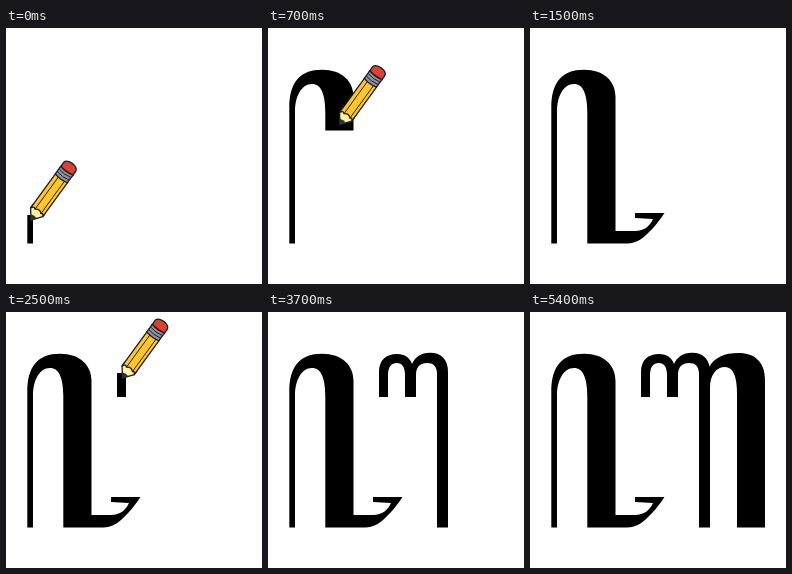
Write an HTML page without scripts that moves like this. It is 256 px wide and 256 px high and loops after 7.4 s.

```html
<!DOCTYPE html>
<html lang="en">
<head>
<meta charset="utf-8">
<title>Pencil writing</title>
<style>
@property --d { syntax: "<number>"; inherits: true; initial-value: 0; }
@property --on { syntax: "<number>"; inherits: true; initial-value: 0; }

html, body { margin: 0; width: 100%; height: 100%; overflow: hidden; background: #fff; }
svg { display: block; width: 100vw; height: 100vh; }

/* --d: length of the stroke drawn so far, --on: pencil visible */
.stroke { animation: 7.4s step-end infinite; }
.ink {
  d: var(--line);
  fill: none;
  stroke: #fff;
  stroke-dasharray: calc(var(--d) * 1px) 999px;
}
.pen {
  opacity: var(--on);
  offset-path: var(--line);
  offset-distance: calc((var(--d) - 5.5) * 1px);
  offset-rotate: 0deg;
}

#one {
  --line: path("M24 216V75A23.5 27 0 0 1 71 75V198Q71 209 82 209H100Q118 209 132 187L134 185H105");
  animation-name: one;
}
#two {
  --line: path("M115.5 85V59A13.5 12.5 0 0 1 142.5 59V85V59A16 12.5 0 0 1 174.5 59V216");
  animation-name: two;
}
#three {
  --line: path("M178 78C182 56 190 48.500 200 48.500H206C216 49 221 58 221 72V216");
  animation-name: three;
}

@keyframes one {
  0% { --d: 29; --on: 1; animation-timing-function: steps(7); }
  9.459% { --d: 247.5; --on: 1; }
  10.81% { --d: 258; --on: 1; animation-timing-function: steps(6); }
  18.918% { --d: 427; --on: 1; }
  20.27%, 100% { --d: 900; --on: 0; }
}
@keyframes two {
  0% { --d: 0; --on: 0; }
  33.783% { --d: 24; --on: 1; animation-timing-function: steps(7); }
  43.243% { --d: 213; --on: 1; animation-timing-function: steps(4); }
  48.648% { --d: 299; --on: 1; }
  49.999%, 100% { --d: 900; --on: 0; }
}
@keyframes three {
  0% { --d: 0; --on: 0; }
  63.513% { --d: 42; --on: 1; animation-timing-function: steps(6); }
  71.621% { --d: 192; --on: 1; }
  72.972%, 100% { --d: 900; --on: 0; }
}
</style>
</head>
<body>
<svg viewBox="0 0 256 256">
  <defs>
    <!-- tip near 0,0 -->
    <g id="pencil" transform="translate(.5 .3) rotate(36)" stroke="#1d1a2b" stroke-width="1.3" stroke-linejoin="round">
      <path fill="#fff3a0" d="M0 -.7L-7.500 -10.500V-15H7.500V-10.500Z"/>
      <path fill="#2b303c" stroke="none" d="M0 0L-4 -5.600Q0 -7.200 4 -5.600Z"/>
      <path fill="#ffc629" d="M-7.500 -10.500Q-5.500 -14.500 -3.200 -12Q.5 -15.500 4.200 -12Q6 -14 7.500 -10.500V-53H-7.500Z"/>
      <path fill="none" stroke-width=".9" d="M-3.200 -12V-53M4.200 -12V-53"/>
      <path fill="#d9432f" d="M-7.500 -61V-67Q-7 -70.500 0 -71Q7 -70.500 7.500 -67V-61Z"/>
      <path fill="#8f919e" d="M-7.500 -52.500Q0 -50.500 7.500 -52.500V-62Q0 -60 -7.500 -62Z"/>
      <path fill="none" stroke-width=".9" d="M-7.500 -55.700Q0 -53.700 7.500 -55.700M-7.500 -58.800Q0 -56.800 7.500 -58.800"/>
    </g>
  </defs>

  <g class="stroke" id="one">
    <mask id="m1" maskUnits="userSpaceOnUse" x="0" y="0" width="256" height="256">
      <path class="ink" stroke-width="44"/>
    </mask>
    <path mask="url(#m1)" d="M21.300 215.500V80C21.300 54 32 41.700 54 41.700C74 41.700 85.500 53 85.500 69V203H105C114 203 120 198 123 191L105 190V185H134.500C130 192 122 202 115 208C108 214 103 215.500 94 215.500H57.300V84C57.300 66 53 56 44 56C33 56 27 69 27 84V215.500Z"/>
    <g class="pen"><use href="#pencil"/></g>
  </g>

  <g class="stroke" id="two">
    <mask id="m2" maskUnits="userSpaceOnUse" x="0" y="0" width="256" height="256">
      <path class="ink" stroke-width="20"/>
    </mask>
    <path mask="url(#m2)" d="M111 85.500V60C111 48 118 42 129 42C137 42 142 46 144 52C147 45 153 40.700 162 40.700C174 40.700 180 48 180 60V215.500H169V62C169 54 165 51 159 51C152 51 148 55 148 63V85.500H137V63C137 55 134 51 129 51C123 51 120 55 120 63V85.500Z"/>
    <g class="pen"><use href="#pencil"/></g>
  </g>

  <g class="stroke" id="three">
    <mask id="m3" maskUnits="userSpaceOnUse" x="0" y="0" width="256" height="256">
      <path class="ink" stroke-width="36"/>
    </mask>
    <path mask="url(#m3)" d="M179 55C185 45 195 41 208 41C226 41 235 51 235 68V215.500H207V82C207 64 203 55 195 55C186 55 180 63 180 76H179Z"/>
    <g class="pen"><use href="#pencil"/></g>
  </g>
</svg>
</body>
</html>
```
